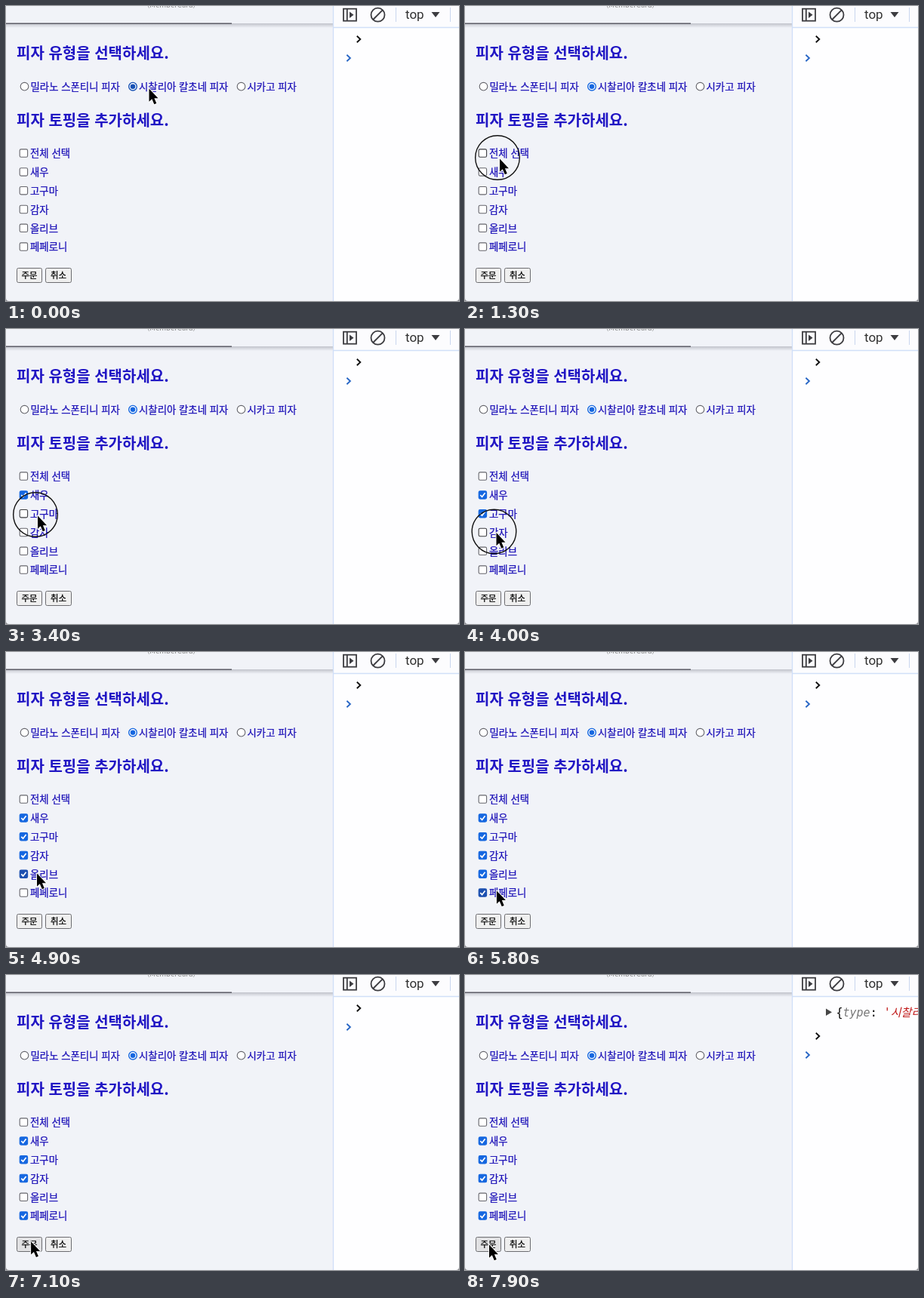
An HTML page that plays this animation: 600 by 391 pixels, repeating every 8000 ms.

```html
<!DOCTYPE html>
<html lang="ko">
<head>
<meta charset="utf-8">
<style>
html, body { margin: 0; height: 100%; overflow: hidden; background: #8a8a90; }
svg { display: block; width: 600px; height: 391px; font-family: "Noto Sans CJK KR", "Noto Sans CJK", sans-serif; }
.label { font-size: 13.4px; fill: #1d12b8; stroke: #1d12b8; stroke-width: .25; }
.head { font-size: 20px; font-weight: 700; fill: #2015c4; }
.btn { font-size: 11.4px; text-anchor: middle; stroke: #000; stroke-width: .25; }
.mono { font: 15px "DejaVu Sans Mono", "Noto Sans CJK KR", monospace; }
.line { fill: none; stroke: #3c3c40; stroke-width: 1.8; }
.chev { fill: none; stroke: #111; stroke-width: 1.9; }
</style>
</head>
<body>
<svg viewBox="0 0 600 391">
  <defs>
    <linearGradient id="shade" x2="0" y2="1">
      <stop stop-color="#9a9ca6" stop-opacity=".55"/>
      <stop offset="1" stop-color="#9a9ca6" stop-opacity="0"/>
    </linearGradient>
    <clipPath id="screen"><path d="M0 0H600V387Q600 391 596 391H4Q0 391 0 387Z"/></clipPath>
  </defs>
  <g clip-path="url(#screen)">
    <rect width="434" height="391" fill="#f1f3f8"/>
    <text x="219" y="1.5" font-size="9.5" fill="#888" text-anchor="middle">(MemberCard)</text>
    <rect y="23" width="433" height="6" fill="url(#shade)"/>
    <rect y="22.5" width="299" height="1.4" fill="#55555f"/>

    <text class="head" x="14" y="70.3">피자 유형을 선택하세요.</text>
    <text class="head" x="14" y="158.8">피자 토핑을 추가하세요.</text>
    <g id="form"></g>

    <rect x="433" width="167" height="391" fill="#fefeff"/>
    <rect x="434" width="166" height="28" fill="#fcfcfe"/>
    <path d="M433.5 0V391M434 28.5H600" stroke="#d0dff8" stroke-width="1.3"/>
    <path d="M516.5 2V21M588.5 2V21" stroke="#c9d6ee"/>
    <rect class="line" x="447" y="3.7" width="17" height="16"/>
    <path class="line" d="M451.8 3.7V19.7"/>
    <path d="M455 7.5L460.5 11.7L455 16Z" fill="#3c3c40"/>
    <circle class="line" cx="492.5" cy="11.7" r="9"/>
    <path class="line" d="M486.2 18L498.8 5.4"/>
    <text x="529" y="17" font-size="17" fill="#303030" style="font-family:Roboto,sans-serif">top</text>
    <path d="M563.5 8H574.5L569 15Z" fill="#3c3c40"/>

    <g id="log">
      <path d="M478 44.5L486 49.3L478 54Z" fill="#474747"/>
      <text class="mono" x="491.5" y="54.5" xml:space="preserve">{<tspan font-style="italic" fill="#777">type</tspan>: <tspan font-style="italic" fill="#c01a1a">'시찰리아 칼초네 피자'</tspan></text>
    </g>
    <g id="prompt">
      <path class="chev" d="M464.8 39.8L469.3 44L464.8 48.2"/>
      <path class="chev" d="M451.4 64.8L455.9 69L451.4 73.2" style="stroke:#2a68c6"/>
    </g>

    <circle id="ring" r="29.3" fill="none" stroke="#111" stroke-width="1.4"/>
    <path id="arrow" d="M1 1.5V18.8L4.8 15.3L7.8 22.3L10.8 21L7.9 14.2H13Z" stroke="#fff" stroke-width="1.8" paint-order="stroke" stroke-linejoin="round"/>
  </g>
</svg>
<script>
const LOOP = 8000, STEP = 100;
const $ = id => document.getElementById(id);
const radios = [[24.5, '밀라노 스폰티니 피자'], [168, '시찰리아 칼초네 피자'], [311.5, '시카고 피자']];
const toppings = ['전체 선택', '새우', '고구마', '감자', '올리브', '페페로니'];
const rowY = i => 195.2 + i * 24.8;

// start, end, x, y
const moves = [
  [250, 1100, 45, 201], [2400, 2700, 42, 229.5], [3150, 3400, 41, 246],
  [3700, 3900, 40.5, 268.5], [4300, 4600, 40, 290], [4850, 5150, 40, 318],
  [5700, 6100, 46, 298], [6600, 7200, 31, 356]
];
// press time, toppings toggled
const clicks = [
  [1200, [0, 1, 2, 3, 4, 5]], [2050, [0, 1, 2, 3, 4, 5]], [2850, [1]], [3400, [2]],
  [3900, [3]], [4600, [4]], [5150, [5]], [6100, [4]], [7200, []]
];

const ease = p => p * p * (3 - 2 * p);
const clamp = v => Math.max(0, Math.min(1, v));

function pointer(t) {
  let x = 188.5, y = 108;
  for (const [a, b, tx, ty] of moves) {
    const p = ease(clamp((t - a) / (b - a)));
    x += (tx - x) * p;
    y += (ty - y) * p;
  }
  return [x, y];
}

function radio([x, label], on, hover) {
  const color = on ? (hover ? '#1650b4' : '#1567e0') : '#66666c';
  return `<circle cx="${x}" cy="106.7" r="5.3" fill="#fff" stroke="${color}" stroke-width="${on ? 1.4 : 1.1}"/>` +
    (on ? `<circle cx="${x}" cy="106.7" r="3.3" fill="${color}"/>` : '') +
    `<text class="label" x="${x + 8}" y="111.9">${label}</text>`;
}

function checkbox(i, on, hover) {
  const y = rowY(i);
  const fill = on ? (hover ? '#1c50b0' : '#1567e0') : '#fff';
  const stroke = on ? fill : hover ? '#3c3c40' : '#66666c';
  return `<rect x="18.2" y="${y - 5.3}" width="10.4" height="10.4" rx="1.8" fill="${fill}" stroke="${stroke}" stroke-width="1.1"/>` +
    (on ? `<path d="M20.3 ${y}l2.3 2.5l4-5.2" fill="none" stroke="#fff" stroke-width="1.7"/>` : '') +
    `<text class="label" x="32" y="${y + 5.1}">${toppings[i]}</text>`;
}

function button(x, w, label, hover) {
  return `<rect x="${x + .5}" y="347.5" width="${w}" height="19" rx="2" fill="${hover ? '#e1e1e3' : '#efefef'}" stroke="#6c6c70"/>` +
    `<text class="btn" x="${x + .5 + w / 2}" y="361">${label}</text>`;
}

function draw(t) {
  const [x, y] = pointer(t);
  const checked = toppings.map((_, i) =>
    clicks.filter(([at, rows]) => t >= at + 200 && rows.includes(i)).length % 2 === 1);
  const press = clicks.find(([at]) => t >= at && t < at + 250);
  const hoverRow = x < 85 && y < 330 ? Math.round((y - rowY(0)) / 24.8) : -1;
  const overRadio = y < 116 && x > 160;

  $('form').innerHTML =
    radios.map((r, i) => radio(r, i === 1, overRadio)).join('') +
    toppings.map((_, i) => checkbox(i, checked[i], i === hoverRow)).join('') +
    button(14, 33, '주문', y > 347) + button(52, 34, '취소', false);

  $('ring').setAttribute('transform', `translate(${x - 2} ${y})`);
  $('ring').setAttribute('opacity', press ? clamp((press[0] + 250 - t) / 100) : 0);
  $('arrow').setAttribute('transform', `translate(${x} ${y})`);

  const logged = t >= 7400;
  $('log').setAttribute('visibility', logged ? 'visible' : 'hidden');
  $('prompt').setAttribute('transform', `translate(0 ${logged ? 37 : 0})`);
}

const start = performance.now();
function frame() {
  const t = (performance.now() - start) % LOOP;
  draw(Math.floor(t / STEP) * STEP);
  requestAnimationFrame(frame);
}
frame();
</script>
</body>
</html>
```
